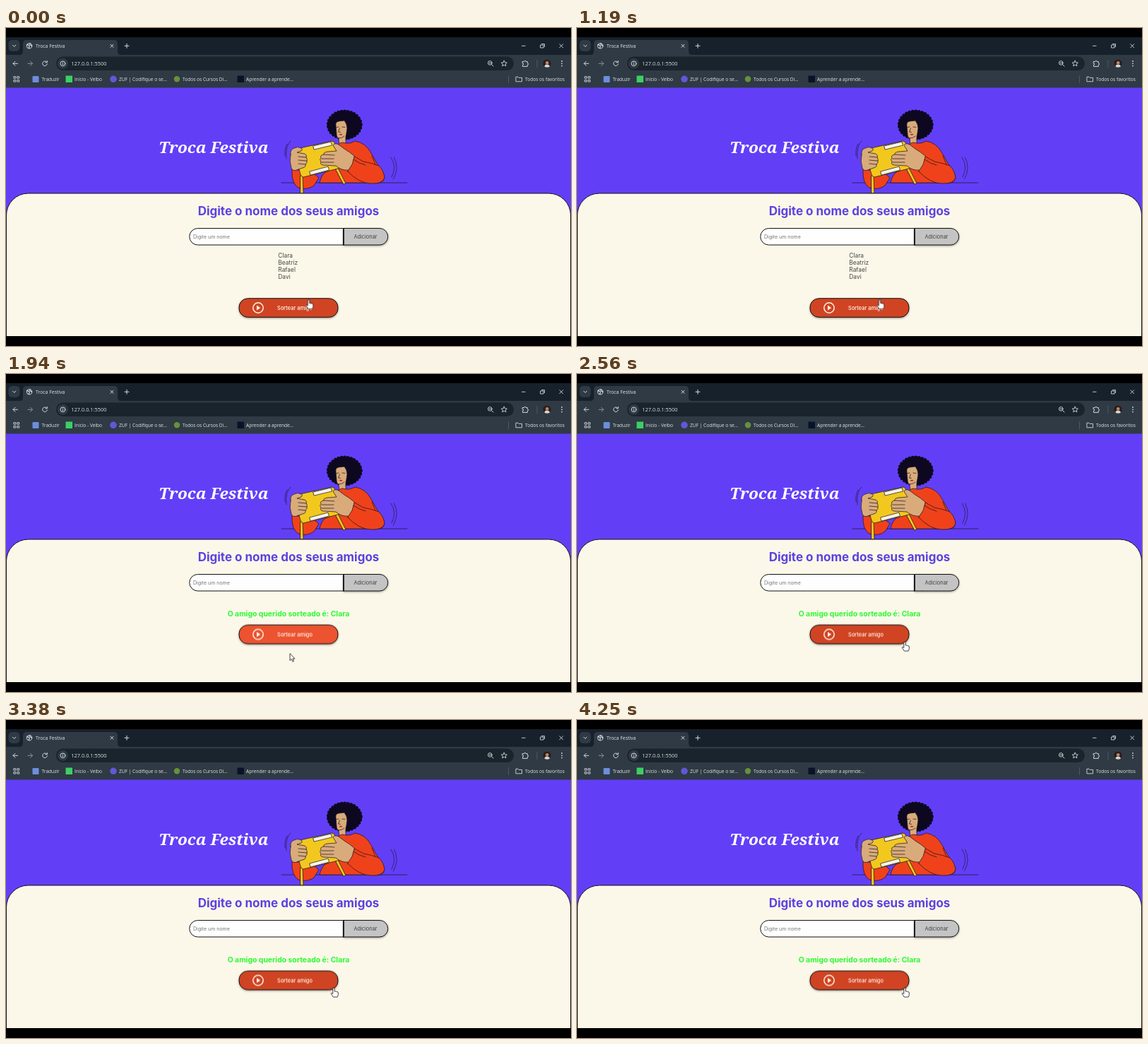
These frames come from a looping animation (800x450 px, 4.31 s). An HTML page:

```html
<!DOCTYPE html>
<html lang="pt-BR">
<head>
<meta charset="utf-8">
<title>Troca Festiva</title>
<style>
  html, body { margin: 0; width: 100%; height: 100%; overflow: hidden; background: #000; }
  svg { display: block; width: 100%; height: 100%; }
  text { white-space: pre; }
  .ui { font-family: "Open Sans", "Noto Sans", sans-serif; font-size: 6.6px; fill: #dfe4e8; }
  .page { font-family: Inter, Arial, sans-serif; }
  .mid { text-anchor: middle; }
  .icon { fill: none; stroke: #d3d9de; stroke-width: 1; stroke-linecap: round; stroke-linejoin: round; }
  .ink { stroke: #17131c; stroke-width: .7; stroke-linejoin: round; stroke-linecap: round; }
  .line { fill: none; }
  .skin { fill: #d9ab7b; }
  .red { fill: #ef421b; }
  .yellow { fill: #f2c81f; }
  .shadow { filter: drop-shadow(0 1.6px 1.4px rgba(0, 0, 0, .4)); }

  .names, .result, .draw, .draw-face, .cursor, .arrow, .hand { animation: 4310ms step-end infinite; }
  .names { animation-name: names; }
  .result { animation-name: result; }
  .draw { animation-name: lift; }
  .draw-face { animation-name: hover; }
  .arrow { animation-name: arrow; }
  .hand { animation-name: hand; }
  .cursor { animation-name: travel; animation-timing-function: linear; }

  @keyframes names { 0% { opacity: 1 } 42%, 100% { opacity: 0 } }
  @keyframes result { 0% { opacity: 0 } 42%, 100% { opacity: 1 } }
  @keyframes lift { 0% { transform: none } 42%, 100% { transform: translateY(-27.5px) } }
  @keyframes hover { 0% { fill: #d04423 } 42% { fill: #ec5330 } 57.2%, 100% { fill: #d04423 } }
  @keyframes arrow { 0% { opacity: 0 } 42% { opacity: 1 } 57.2%, 100% { opacity: 0 } }
  @keyframes hand { 0% { opacity: 1 } 42% { opacity: 0 } 57.2%, 100% { opacity: 1 } }
  @keyframes travel {
    0%, 42% { transform: translate(428.5px, 384.5px) }
    44.8%, 53.6% { transform: translate(402px, 395.5px) }
    58%, 100% { transform: translate(464px, 379px) }
  }
</style>
</head>
<body>
<svg viewBox="0 0 800 450">
  <rect width="800" height="450"/>

  <!-- browser window -->
  <rect y="13" width="800" height="26" fill="#16212b"/>
  <rect y="38" width="800" height="47" fill="#2f3a44"/>
  <path d="M18 38.5q6 0 6-6V22q0-5 5-5H153q5 0 5 5V32.5q0 6 6 6Z" fill="#2f3a44"/>
  <rect x="3.5" y="17" width="16" height="16" rx="5" fill="#2f3a44"/>
  <rect x="71" y="40.5" width="648" height="19.5" rx="9.75" fill="#19242d"/>
  <circle cx="80.5" cy="50.3" r="7.5" fill="#2f3a44"/>

  <g class="icon">
    <path d="M9.5 24.2l2.2 2.2 2.2-2.2"/>
    <circle cx="33" cy="25.3" r="3.7"/>
    <path d="M29.5 24q3-.5 3.5 1.5t-1 3M34 21.8q-.8 2 1 2.5t1.5 1.5" stroke-width="1.3"/>
    <path d="M148 23.3l4 4m0-4l-4 4M168 25.3h6m-3-3v6"/>
    <path d="M730.5 25.3h4.6M757 24h4v4h-4ZM758.5 22.6h4v4M783.7 22.8l5 5m0-5l-5 5" stroke-width=".9"/>
    <path d="M16.5 50.3h-6.5m3-3l-3 3 3 3"/>
    <path d="M31 50.3h6.5m-3-3l3 3-3 3" stroke="#8a949c"/>
    <path d="M57.7 48.3a3.3 3.3 0 1 0 .6 2.5M58.3 46.5v2.2h-2.3"/>
    <circle cx="80.5" cy="50.3" r="3.4"/>
    <path d="M80.5 50.2v1.7M80.5 48.4v.1"/>
    <circle cx="685.3" cy="49.4" r="2.8"/>
    <path d="M687.5 51.6l2.5 2.5M684.2 49.4h2.2"/>
    <path d="M705.3 46.2l1.2 2.6 2.9.3-2.2 1.9.7 2.8-2.6-1.5-2.6 1.5.7-2.8-2.2-1.9 2.9-.3Z" stroke-width=".9"/>
    <path d="M731.5 47.6h2.2a1.2 1.2 0 0 1 2.4 0h2.2v2.2a1.2 1.2 0 0 1 0 2.4v2.2h-6.8v-2.2a1.2 1.2 0 0 0 0-2.4Z"/>
    <path d="M11.3 68.7h2.5v2.5h-2.5Zm4.9 0h2.5v2.5h-2.5Zm-4.9 4.9h2.5v2.5h-2.5Zm4.9 0h2.5v2.5h-2.5Z" stroke-width=".9"/>
    <path d="M722.3 69.2h2.7l1 1.2h4.5v5.4h-8.2Z" stroke-width=".9"/>
    <path d="M752 45.5v10M711.5 67.5v10" stroke="#55616b" stroke-width=".8"/>
  </g>
  <g fill="#d3d9de">
    <circle cx="787" cy="47" r=".9"/><circle cx="787" cy="50.3" r=".9"/><circle cx="787" cy="53.6" r=".9"/>
  </g>
  <circle cx="766" cy="50.3" r="5.6" fill="#2a1d1a"/>
  <path d="M762.3 54.5q.5-3 3.7-3t4 3q-3.8 2.5-7.7 0Z" fill="#d8d5ce"/>
  <circle cx="766.2" cy="49.3" r="2.3" fill="#b9886c"/>

  <rect x="37.5" y="68" width="9" height="9" rx="1" fill="#6d8edb"/>
  <rect x="84.5" y="67.5" width="9.5" height="9.5" fill="#3ccf63"/>
  <circle cx="152" cy="72.3" r="4.8" fill="#6257d6"/>
  <circle cx="242" cy="72.3" r="4.2" fill="#66913c"/>
  <rect x="327.5" y="67.5" width="9.5" height="9.5" fill="#071329"/>

  <g class="ui">
    <text x="42" y="27.8" font-size="6.9">Troca Festiva</text>
    <text x="92.3" y="53" font-size="7.4">127.0.0.1:5500</text>
    <text x="50.5" y="74.7">Traduzir</text>
    <text x="97" y="74.7">Início - Velbo</text>
    <text x="160" y="74.7">ZUF | Codifique o se...</text>
    <text x="250" y="74.7">Todos os Cursos Di...</text>
    <text x="340" y="74.7">Aprender a aprende...</text>
    <text x="735" y="74.7">Todos os favoritos</text>
  </g>

  <!-- header -->
  <rect y="84.5" width="800" height="351.5" fill="#623ff7"/>
  <text class="mid" x="294" y="176.5" fill="#fff" font-family="'Noto Serif', serif" font-size="22.5" font-weight="700" font-style="italic">Troca Festiva</text>

  <!-- person shaking the box -->
  <g class="ink">
    <path class="line" d="M390 219H568"/>
    <path class="line" d="M403 160q-8 7-6 25M398 164q-4 7-3 17M545 183q9 13 1 28M549.5 183q8 15-1 31" stroke-width=".6"/>
    <ellipse cx="479.3" cy="137" rx="23" ry="19" fill="#0d0820" stroke="#0d0820" stroke-width="5" stroke-dasharray="0 4.5"/>
    <path class="skin" d="M467 138q-1-5 4-6l8-1q4 5 4 11q-1 8-2 12v9q-2 3-9 2l-1-9q-3-1-3-6Z"/>
    <path class="line" d="M472.5 142l-2 5 3 .4M468 140.500l3-.5M476 140l4 .4M471 156q5 0 8-3"/>
    <path d="M471.5 150.5q3-1.500 5 0q-2 2.500-5 0Z" fill="#c62225" stroke="none"/>

    <path class="red" d="M405 201q-1 19 9 25q12 4 22-3l7-11-11-10Z"/>
    <path class="red" d="M470 166q2-4 7-4q9 3 17-2q15 2 23 17q11 20 18 31q3 10-8 11H444q2-10 8-15l18-7Z"/>
    <path class="red" d="M484 203q16 17 33 17q16 1 19-8q-1-10-8-17q-10-4-22-6l-16-9q-7 10-6 23Z"/>
    <path class="line" d="M492 186q8 6 17 8M518 181l5 12"/>

    <path class="yellow" d="M417 209l3-1 1 26h-4ZM467 200l3-2 11 22-3 1Z"/>
    <path class="yellow" d="M408 175q0-3 4-4l49-11q4 0 5 4l8 30q0 4-4 5l-49 12q-3 0-4-4Z"/>
    <path d="M435 167l25-6 1.500 5-25 6ZM430 203l26-7 1.500 5-26 7Z" fill="#f7f3e8"/>

    <path class="skin" d="M403 179q-1-7 5-9q5-3 10 0q3 2 0 4l-6 2 11 2q4 2 2 5q2 2 1 5q1 3-2 5q1 4-4 5l-6 2q-8 4-10-2q-3-9-1-19Z"/>
    <path class="line" d="M425 183l-11-1M426 188l-12-1M424 193l-10-1"/>
    <path class="skin" d="M493 181q-7-6-14-10l-8-6q-6-3-8 1l5 8-13 1q-6 1-5 4q-6 1-4 5q-3 2 0 5q-2 4 3 5l18 1q8 7 18 6l5-8Z"/>
    <path class="line" d="M450 179l15 1M447 185l17 0M447 190l17 0"/>
  </g>

  <!-- card -->
  <path d="M.5 436V265a31 31 0 0 1 31-31H768.5a31 31 0 0 1 31 31V436" fill="#fcf8e9" stroke="#111"/>

  <g class="page">
    <text class="mid" x="400" y="265" font-size="17" font-weight="700" fill="#5b42e0">Digite o nome dos seus amigos</text>

    <path d="M478 283.5H271.5a11.75 11.75 0 0 0 0 23.5H478Z" fill="#fffefe" stroke="#111"/>
    <path class="shadow" d="M478 283.5H529a11.75 11.75 0 0 1 0 23.5H478Z" fill="#c4c4c4" stroke="#111"/>
    <path d="M478 283v24.5" stroke="#111" stroke-width="1.6"/>
    <text x="265" y="297.9" font-size="7" fill="#757575">Digite um nome</text>
    <text class="mid" x="509" y="298" font-size="7.4" fill="#444">Adicionar</text>

    <g class="names" font-size="8.4" fill="#444">
      <text x="385.3" y="325">Clara</text>
      <text x="385.3" y="335">Beatriz</text>
      <text x="385.3" y="345">Rafael</text>
      <text x="385.3" y="355">Davi</text>
    </g>
    <text class="result mid" x="400" y="343.2" font-size="10.4" font-weight="700" fill="#2bfb2f">O amigo querido sorteado é: Clara</text>

    <g class="draw">
      <g class="shadow">
        <rect class="draw-face" x="330" y="382.7" width="140" height="26.6" rx="12.5" stroke="#111"/>
      </g>
      <circle cx="357" cy="396" r="7.2" fill="none" stroke="#fff4e4" stroke-width="1.5"/>
      <path d="M355 392.6l5.2 3.4-5.2 3.4Z" fill="#fff4e4"/>
      <text class="mid" x="409" y="398.7" font-size="7.4" font-weight="500" fill="#fff8ec">Sortear amigo</text>
    </g>
  </g>

  <g class="cursor" fill="#fff" stroke="#111" stroke-width=".8" stroke-linejoin="round">
    <path class="arrow" d="M0 0V10l2.3-2.1 1.6 3.6 1.7-.7-1.6-3.5H7Z"/>
    <path class="hand" d="M-1.2 1Q-1.2 0 0 0T1.2 1V5q1-.6 1.9.3q1-.5 1.7.4q1.3-.3 1.5 1V9.5q0 2-1.2 3.5H-.6q-1.4-2.2-3-4.3q-.4-1.3.8-1.4l1.6 1.2Z"/>
  </g>
</svg>
</body>
</html>
```
